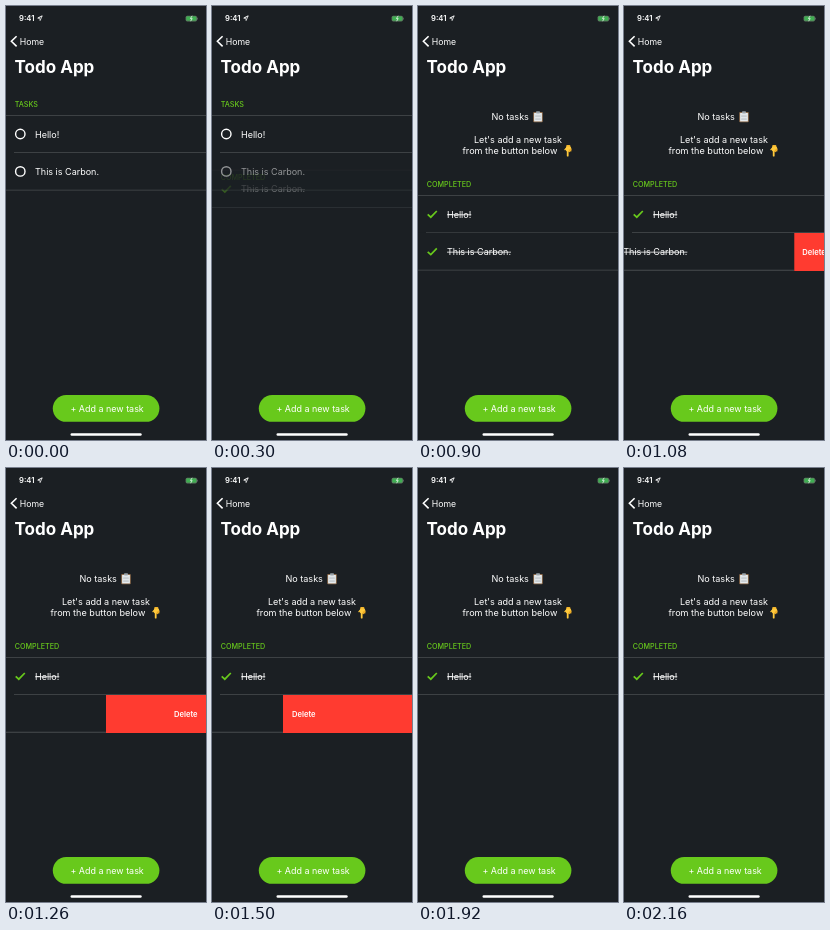
Recreate the animation shown at these times as an HTML page with a canvas. Size 200x434 px, loop 2220 ms.

```html
<!DOCTYPE html>
<html lang="en">
<head>
<meta charset="utf-8">
<title>Todo App</title>
<style>
html, body { margin: 0; width: 100%; height: 100%; overflow: hidden; background: #1b1f23; }
canvas { display: block; width: 200px; height: 434px; }
</style>
</head>
<body>
<canvas id="stage"></canvas>
<script>
const W = 200, H = 434, LOOP = 2220, STEP = 60, ROW = 37.4;
const BG = '#1b1f23', GREEN = '#68c91c', RED = '#ff3b30', RULE = '#484c4f', WHITE = '#fff';
const canvas = document.getElementById('stage');
const ctx = canvas.getContext('2d');
const dpr = window.devicePixelRatio || 1;
canvas.width = W * dpr;
canvas.height = H * dpr;
ctx.scale(dpr, dpr);

const ease = p => p * p * (3 - 2 * p);
const span = (t, from, to) => ease(Math.min(1, Math.max(0, (t - from) / (to - from))));
const mix = (a, b, p) => a + (b - a) * p;

function text(str, x, y, size, weight = 400, color = WHITE) {
  ctx.font = `${weight} ${size}px Inter, "Liberation Sans", sans-serif`;
  ctx.fillStyle = color;
  ctx.fillText(str, x, y);
}

function box(x, y, w, h, color, r = 0) {
  ctx.fillStyle = color;
  ctx.beginPath();
  ctx.roundRect(x, y, w, h, r);
  ctx.fill();
}

function path(points, color, width) {
  ctx.beginPath();
  points.forEach(([x, y]) => ctx.lineTo(x, y));
  ctx.strokeStyle = color;
  ctx.lineWidth = width;
  ctx.stroke();
}

function faded(alpha, draw) {
  if (alpha <= 0) return;
  ctx.save();
  ctx.globalAlpha = alpha;
  draw();
  ctx.restore();
}

const rule = (y, x = 0, end = W) => box(x, y - 0.4, end - x, 0.8, RULE);
const header = (label, y) => text(label, 8.7, y + 2.8, 7.2, 500, GREEN);

// y is the middle of the row; "first" and "last" rows carry full-width rules
function row(label, y, done, first, last) {
  const top = y - ROW / 2;
  box(0, top, W, ROW, BG);
  if (first) rule(top);
  rule(top + ROW, last ? 0 : 8);
  text(label, 29, y + 3.5, 9);
  if (done) {
    const width = ctx.measureText(label).width;
    box(29, y + 0.4, width, 0.8, WHITE);
    path([[9.7, y + 0.4], [12.8, y + 3.2], [18.8, y - 3]], GREEN, 1.7);
  } else {
    ctx.beginPath();
    ctx.arc(14.3, y, 4.7, 0, Math.PI * 2);
    ctx.strokeStyle = WHITE;
    ctx.lineWidth = 1.4;
    ctx.stroke();
  }
}

function clipboard(x, y) {
  box(x, y + 0.8, 9.6, 10.2, '#8d6b4c', 1);
  box(x + 0.9, y + 1.8, 7.8, 8.4, '#e6ebee');
  box(x + 2.8, y, 4, 2.4, '#9aa2a8', 0.8);
  for (let i = 0; i < 4; i++) box(x + 2, y + 3.7 + i * 1.5, 5.6, 0.5, '#a9b0b5');
}

function pointer(x, y) {
  box(x + 2, y, 4.2, 3, '#f2b52c', 1);
  box(x + 1.6, y + 1.6, 5.4, 4.8, '#ffc93c', 1.6);
  path([[x + 0.4, y + 5.2], [x + 2.6, y + 2.6]], '#ffc93c', 1.3);
  box(x + 2.6, y + 4, 1.8, 7.6, '#ffc93c', 0.9);
  box(x + 4.6, y + 4.2, 1.2, 3, '#eda922', 0.6);
  box(x + 6, y + 3.6, 1.2, 3, '#eda922', 0.6);
}

function emptyNote() {
  text('No tasks', 73.5, 114.4, 9.05);
  clipboard(115.2, 105.2);
  text("Let's add a new task", 56, 136.9, 9.05);
  text('from the button below', 44.5, 148.4, 9.1);
  pointer(146.2, 139);
}

function battery() {
  box(179.6, 9.8, 11.4, 5.6, '#5d7a60', 1.6);
  box(180.4, 10.6, 9.8, 4, '#3fae52', 0.8);
  box(191.3, 11.5, 0.7, 2.2, '#6b7174', 0.4);
  path([[186.2, 9.8], [184.4, 12.6], [186.2, 12.6], [184.6, 15.2]], '#d9f0dc', 0.9);
}

function chrome() {
  text('9:41', 13, 15.2, 7.7, 600);
  path([[36.2, 9.9], [31.8, 12.1], [33.9, 12.4], [34.1, 14.6], [36.2, 9.9], [31.8, 12.1]], WHITE, 0.7);
  battery();
  path([[10.6, 30.2], [5.4, 35.3], [10.6, 40.4]], WHITE, 1.6);
  text('Home', 13.8, 38.5, 8.7);
  text('Todo App', 8.6, 66.6, 17, 700);
  box(46.8, 389, 106.6, 26.8, GREEN, 13.4);
  text('+ Add a new task', 64.4, 406, 8.95);
  box(64.5, 427.2, 71.2, 2.5, WHITE, 1.25);
}

// first task is checked off
function checkSecond(t) {
  const p = span(t, 150, 460);
  header('TASKS', 98);
  faded(p, () => header('COMPLETED', 171));
  faded(p * 0.75 + (p === 1 ? 0.25 : 0), () => row('This is Carbon.', mix(165.4, 202, p), true, true, true));
  faded(1 - p, () => row('This is Carbon.', 165.4, false, false, true));
  row('Hello!', 128, false, true, p > 0.5);
}

// remaining task moves down, leaving the note
function checkFirst(t) {
  const p = span(t, 600, 900);
  header('COMPLETED', mix(171, 178, p));
  faded(p, () => row('Hello!', mix(202, 208, p), true, true, false));
  row('This is Carbon.', mix(202, 245.4, p), true, false, true);
  faded(1 - p, () => {
    header('TASKS', 98);
    row('Hello!', 128, false, true, true);
  });
  faded(p * 0.8 + (p === 1 ? 0.2 : 0), emptyNote);
}

function swipe(t) {
  const drag = span(t, 960, 1300);
  const arm = span(t, 1330, 1500);
  const shut = span(t, 1560, 1860);
  const top = 226.7, height = (ROW + 0.6) * (1 - shut);
  const end = mix(200, 96, drag);
  const edge = mix(end, 71, arm) * (1 - span(t, 1700, 1860));

  emptyNote();
  header('COMPLETED', 178);
  row('Hello!', 208, true, true, shut === 1);
  if (shut === 1) return;

  faded(1 - shut, () => rule(top + ROW, 0, end));
  ctx.save();
  ctx.beginPath();
  ctx.rect(0, top + 0.4, W, height);
  ctx.clip();
  ctx.save();
  ctx.translate(end - W, 0);
  row('This is Carbon.', 245.4, true, false, true);
  ctx.restore();
  if (edge < W) {
    box(edge, top, W - edge, ROW + 1, RED);
    text('Delete', mix(Math.max(168, edge + 8), edge + 9, arm), 248.5, 7.6, 600);
  }
  ctx.restore();
  if (shut > 0) faded(0.45, () => box(8, top - 0.4, W - 8, 0.8, RED));
}

function render(t) {
  ctx.globalAlpha = 1;
  box(0, 0, W, H, BG);
  if (t < 600) checkSecond(t);
  else if (t < 960) checkFirst(t);
  else swipe(t);
  chrome();
}

const start = performance.now();
function tick(now) {
  const t = Math.max(0, now - start) % LOOP;
  render(Math.floor(t / STEP) * STEP);
  requestAnimationFrame(tick);
}
render(0);
requestAnimationFrame(tick);
</script>
</body>
</html>
```
